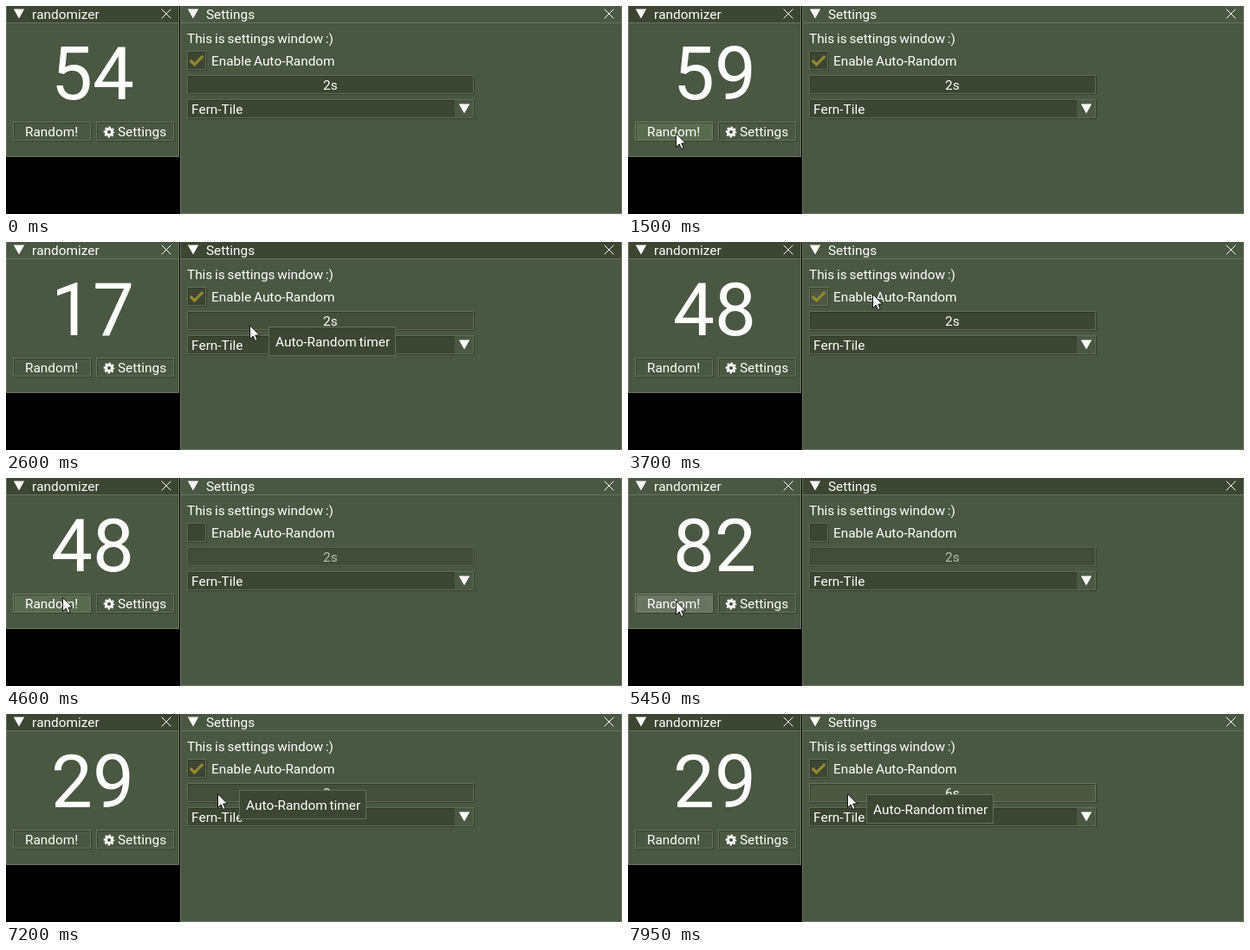
An HTML page that plays this animation: 711 by 241 pixels, repeating every 8000 ms.

```html
<!DOCTYPE html>
<html lang="en">
<head>
<meta charset="utf-8">
<title>randomizer</title>
<style>
  html, body { margin: 0; width: 100%; height: 100%; overflow: hidden; background: #000; }
  svg { display: block; width: 711px; height: 241px; }
  text { font: 15.36px Roboto, "Liberation Sans", sans-serif; font-kerning: none; word-spacing: -1px; fill: #fff; white-space: pre; }
  #number { font-size: 85.33px; }
  .edge { fill: none; stroke: rgba(138, 145, 130, .5); }
  .shade { fill: none; stroke: rgba(36, 41, 28, .52); }
  .arrow { fill: #fff; }
  .cross { stroke: #fff; }
  .gear { fill: none; stroke: #fff; }
</style>
</head>
<body>
<svg id="stage" viewBox="0 0 711 241"></svg>
<script>
const BG = 'rgb(74,87,66)', DARK = 'rgb(61,69,51)';
const FIELD = [DARK, 'rgb(69,77,59)', 'rgb(77,87,66)'];
const BUTTON = [BG, 'rgb(89,107,79)', 'rgb(106,116,98)'];
const LOOP = 8000, STEP = 50, ROW = 22;

// Clickable rows: x, y, width
const areas = {
  random: [8, 134, 90],
  settings: [104, 134, 90],
  check: [209, 52, 170],
  timer: [209, 80, 331],
  combo: [209, 108, 331]
};

// Pointer moves from where the last one ended: time, duration, x, y, bend
const entry = { x: 1, y: 199 };
const moves = [
  [1150, 300, 55, 147],
  [1750, 800, 281, 97, .3],
  [2550, 50, 281, 96],
  [2600, 250, 261, 129],
  [2850, 350, 288, 31],
  [3350, 150, 282, 60],
  [3900, 800, 55, 142],
  [6000, 500, 263, 63],
  [7000, 200, 244, 92],
  [7650, 250, 253, 92]
];
const clicks = [[1550, 1700], [3700, 3800], [5150, 5250], [5450, 5600], [5800, 5900], [6900, 7000], [7250, LOOP]];
const rolls = [54, 59, 17, 48, 82, 35, 78, 29];

const rect = (x, y, w, h, attrs) => `<rect x="${x}" y="${y}" width="${w}" height="${h}" ${attrs}/>`;
const edge = (x, y, w, h, cls = 'edge') => rect(x + .5, y + .5, w - 1, h - 1, `class="${cls}"`);
const frame = (x, y, w) => edge(x + 1, y + 1, w, ROW, 'shade') + edge(x, y, w, ROW);
const label = (x, y, str, attrs = '') => `<text x="${x}" y="${y}" ${attrs}>${str}</text>`;
const arrow = (x, y) => `<path class="arrow" d="M${x - 6.2} ${y - 5.4}h12.4l-6.2 10.8z"/>`;
const field = (id, x, y, w) => rect(x, y, w, ROW, `id="${id}"`) + frame(x, y, w);

function panel(id, x, w, bottom, title) {
  const cx = x + w - 15, r = 5.4;
  return rect(x, -2, w, bottom + 2, `fill="${BG}"`) +
    rect(x + 1, 0, w - 2, 19, `id="${id}"`) +
    edge(x, -2, w, bottom + 2) +
    `<path class="edge" d="M${x + 1} 19.5h${w - 2}"/>` +
    arrow(x + 15, 9) + label(x + 30, 15, title) +
    `<path class="cross" d="M${cx - r} ${9 - r}l${2 * r} ${2 * r}m0 ${-2 * r}l${-2 * r} ${2 * r}"/>`;
}

const stage = document.getElementById('stage');
stage.innerHTML =
  panel('left', 0, 200, 175, 'randomizer') +
  label(0, 108, '', 'id="number"') +
  field('random', ...areas.random) + label(0, 151, '', 'id="roll"') +
  field('settings', ...areas.settings) + label(129, 151, 'Settings') +
  `<g class="gear" transform="translate(119 146)">
    <circle r="3.6" stroke-width="3"/>
    <circle r="5.6" stroke-width="1.6" stroke-dasharray="2.4 2" stroke-dashoffset="1.2"/>
  </g>` +
  panel('right', 201, 510, 241, 'Settings') +
  label(209, 43, 'This is settings window :)') +
  field('check', 209, 52, ROW) +
  '<path id="mark" d="M212.8 63l4.8 4.8 9.6-9.6" fill="none" stroke="rgb(150,138,46)" stroke-width="3.2"/>' +
  label(237, 69, 'Enable Auto-Random') +
  '<g id="timerBox">' + field('timer', ...areas.timer) + label(0, 97, '', 'id="seconds"') + '</g>' +
  field('combo', ...areas.combo) + rect(518, 109, 21, 20, 'id="drop"') +
  label(214, 125, 'Fern-Tile') + arrow(529, 119) +
  '<g id="tip">' + rect(0, 0, 147, 34, `fill="${DARK}"`) + edge(0, 0, 147, 34) + label(8, 23, 'Auto-Random timer') + '</g>' +
  '<path id="pointer" d="M.5 .7V16.5L4.2 13 6.6 18.5 9.2 17.4 6.8 12H11.6z" fill="#fff" stroke="#111"/>';

const el = {};
stage.querySelectorAll('[id]').forEach(node => el[node.id] = node);

const show = (node, on) => node.setAttribute('visibility', on ? 'visible' : 'hidden');
const paint = (node, color) => node.setAttribute('fill', color);
const place = (node, x, y) => node.setAttribute('transform', `translate(${x} ${y})`);

// Centred text starts on a whole pixel
function center(node, x, str) {
  node.textContent = str;
  node.setAttribute('x', Math.floor(x - node.getComputedTextLength() / 2));
}

function pointerAt(t) {
  let from = entry, p = null;
  for (const [start, span, x, y, bend = 0] of moves) {
    if (t < start) break;
    const k = Math.min(1, (t - start) / span), u = k * k * (3 - 2 * k);
    const dx = x - from.x, dy = y - from.y, bow = 2 * u * (1 - u) * bend;
    p = { x: Math.round(from.x + dx * u - dy * bow), y: Math.round(from.y + dy * u + dx * bow) };
    from = { x, y };
  }
  return p;
}

function itemUnder(p) {
  return p && Object.keys(areas).find(key => {
    const [x, y, w] = areas[key];
    return p.x >= x && p.x < x + w && p.y >= y && p.y < y + ROW;
  });
}

// Runs the small app once and keeps its state for every step
function simulate() {
  const states = [];
  let panel = 'right', on = true, roll = 0, due = 1500, seconds = 2, grab = null;
  for (let t = 0; t < LOOP; t += STEP) {
    const p = pointerAt(t), item = itemUnder(p);
    if (clicks.some(c => c[0] === t)) {
      panel = p.x < 200 ? 'left' : 'right';
      if (item === 'timer') grab = p.x;
    }
    if (clicks.some(c => c[1] === t)) {
      if (item === 'random') roll++;
      if (item === 'check') on = !on;
    }
    if (on && t >= due) {
      roll++;
      due = t + seconds * 1000;
    }
    if (grab !== null) seconds = 2 + Math.floor((p.x - grab) / 2);
    const down = clicks.some(([a, b]) => t >= a && t < b);
    const hot = item === 'timer' && !on ? null : item;
    states.push({ p, hot, down, panel, on, seconds, number: rolls[roll] });
  }
  return states;
}

const states = simulate();
center(el.roll, 53, 'Random!');

function draw(i) {
  const { p, hot, down, panel, on, seconds, number } = states[i];
  const level = key => hot !== key ? 0 : down ? 2 : 1;

  for (const key of ['random', 'settings']) paint(el[key], BUTTON[level(key)]);
  for (const key of ['check', 'timer', 'combo']) paint(el[key], FIELD[level(key)]);
  paint(el.drop, BUTTON[level('combo')]);
  for (const side of ['left', 'right']) paint(el[side], panel === side ? BG : DARK);

  center(el.number, 100, number);
  center(el.seconds, 374.5, seconds + 's');
  el.timerBox.setAttribute('opacity', on ? 1 : .6);
  show(el.mark, on);
  show(el.pointer, p);
  show(el.tip, hot === 'timer');
  if (!p) return;
  place(el.pointer, p.x, p.y);
  // The tooltip trails the pointer by one step
  const last = states[i - 1].p || p;
  place(el.tip, last.x + 22, last.y + 1);
}

const start = performance.now();
function tick() {
  draw(Math.floor((performance.now() - start) % LOOP / STEP));
  requestAnimationFrame(tick);
}
tick();
</script>
</body>
</html>
```
